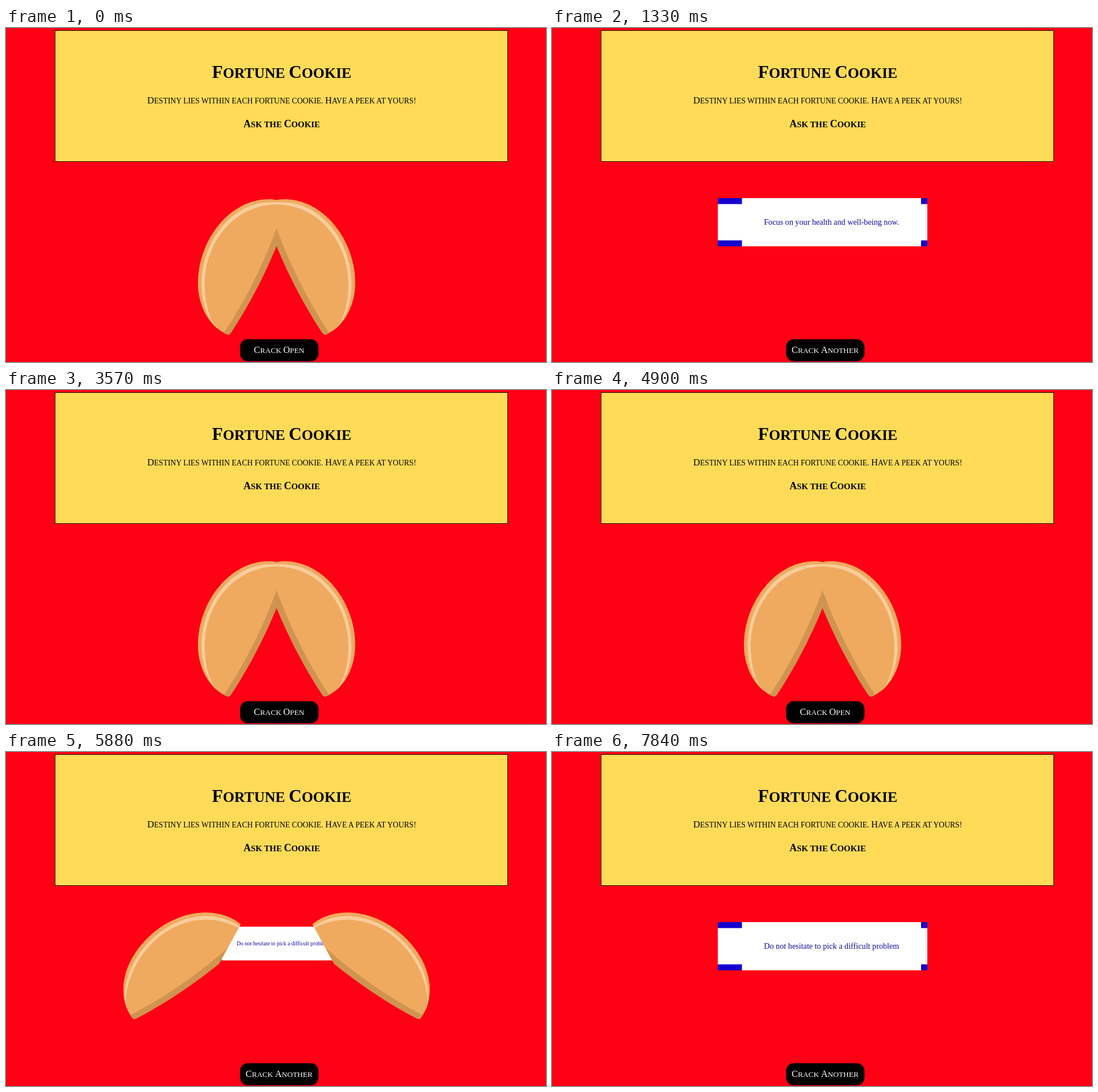
These frames come from a looping animation (951x589 px, 8000 ms). An HTML page:

```html
<!DOCTYPE html>
<html lang="en">
<head>
<meta charset="utf-8">
<title>Fortune Cookie</title>
<style>
  html, body { margin: 0; width: 100%; height: 100%; overflow: hidden; background: #ff0014; }
  svg { display: block; }
  text { font-family: "Liberation Serif", "Times New Roman", serif; text-anchor: middle; white-space: pre; }
  .bold { font-weight: bold; }
</style>
</head>
<body>
<svg width="951" height="589" viewBox="0 0 951 589">
  <defs>
    <g id="shell">
      <path fill="#efaa5f" d="M477 303.500C471 302.300 467 302 462 302C395 302 338 373 338 450C338 490 358 528 391 541
        Q393.500 541 396 537.500Q442 468 477 383Z"/>
      <path fill="#cf9450" d="M477 352Q440 453 384 537.500Q388 540 391 541Q393.500 541 396 537.500Q442 468 477 383Z"/>
      <path fill="#f8cd9b" d="M477 307Q469 307 462 307.500C398 309 344.500 376 344.500 452C344.500 485 356 515 372 530
        C358 514 350 485 350 452C350 379 401 312 477 311Z"/>
    </g>
  </defs>
  <rect x="86.500" y="4.500" width="797" height="231" fill="#ffdb58" stroke="#1a0a00"/>
  <text class="bold caps" x="485.500" y="88" font-size="31.500">Fortune Cookie</text>
  <text class="caps" x="485.500" y="133" font-size="16.650">Destiny lies within each fortune cookie. Have a peek at yours!</text>
  <text class="bold caps" x="485.500" y="175" font-size="18.100">Ask the Cookie</text>
  <g id="paper">
    <path fill="#fff" d="M292 300h369v85h-369z"/>
    <path fill="#1400cd" d="M292 300h42.500v10.500h-42.500zM650 300h11v10.500h-11zM292 374.500h42.500v10.500h-42.500zM650 374.500h11v10.500h-11z"/>
    <text id="fortune" x="492.300" y="347" font-size="14.200" fill="#0c08a0"></text>
  </g>
  <g id="cookie">
    <use id="left" href="#shell"/>
    <g transform="translate(953) scale(-1 1)"><use id="right" href="#shell"/></g>
  </g>
  <rect x="412.500" y="549" width="137.500" height="38.500" rx="13" stroke="#500008"/>
  <text class="caps" id="open" x="481" y="573" font-size="16.400" fill="#fff">Crack Open</text>
  <text class="caps" id="another" x="481" y="573" font-size="16.400" fill="#fff">Crack Another</text>
</svg>
<script>
const LOOP = 8000, STEP = 70, RESET = 3220;
const el = id => document.getElementById(id);
const lerp = (a, b, k) => a + (b - a) * k;
const ramp = (t, from, to) => Math.min(1, Math.max(0, (t - from) / (to - from)));

// cubic-bezier(.25, .1, .25, 1)
function ease(x) {
  const curve = (u, a, b) => 3 * u * (1 - u) ** 2 * a + 3 * u * u * (1 - u) * b + u ** 3;
  let lo = 0, hi = 1;
  for (let i = 0; i < 20; i++) {
    const mid = (lo + hi) / 2;
    if (curve(mid, .25, .25) < x) lo = mid; else hi = mid;
  }
  return curve(lo, .1, 1);
}
const move = (t, from, to) => ease(ramp(t, from, to));

// Small capitals: lower-case runs become smaller upper-case ones
for (const node of document.querySelectorAll(".caps")) {
  const size = node.getAttribute("font-size") * .82;
  node.innerHTML = node.textContent.replace(/[^A-Z]+/g,
    run => `<tspan font-size="${size}">${run.toUpperCase()}</tspan>`);
}

function draw(t) {
  const second = t >= 5530;
  const opened = t >= 700 && t < RESET || second;
  const age = opened ? t - (second ? 5564 : 664) : 0;

  // Halves tilt apart, slide out, then fade
  const slide = move(age, 280, 452);
  const tilt = lerp(30.4 * move(age, 0, 280), 25.2, slide);
  const pose = `translate(${-200 * slide}) rotate(${tilt} 476.5 303)`;
  el("left").setAttribute("transform", pose);
  el("right").setAttribute("transform", pose);
  el("cookie").setAttribute("opacity", 1 - ramp(age, 575, 660));

  // The slip widens behind the halves, then comes forward
  const grow = move(age, 420, 560);
  let sx = lerp(lerp(.2, .7, move(age, 0, 420)), 1, grow), sy = lerp(.7, 1, grow);
  if (t >= RESET && !second) {
    const back = move(t, RESET, RESET + 350);
    sx = lerp(1, .2, back);
    sy = lerp(1, .7, back);
  }
  el("paper").setAttribute("transform",
    `translate(476.5 326.7) scale(${sx} ${sy}) translate(-476.5 -326.7)`);
  el("fortune").textContent = second
    ? "Do not hesitate to pick a difficult problem"
    : "Focus on your health and well-being now.";
  el("open").setAttribute("visibility", opened ? "hidden" : "visible");
  el("another").setAttribute("visibility", opened ? "visible" : "hidden");
}

const start = performance.now();
function tick() {
  const t = (performance.now() - start) % LOOP;
  draw(Math.floor(t / STEP) * STEP);
  requestAnimationFrame(tick);
}
tick();
</script>
</body>
</html>
```
